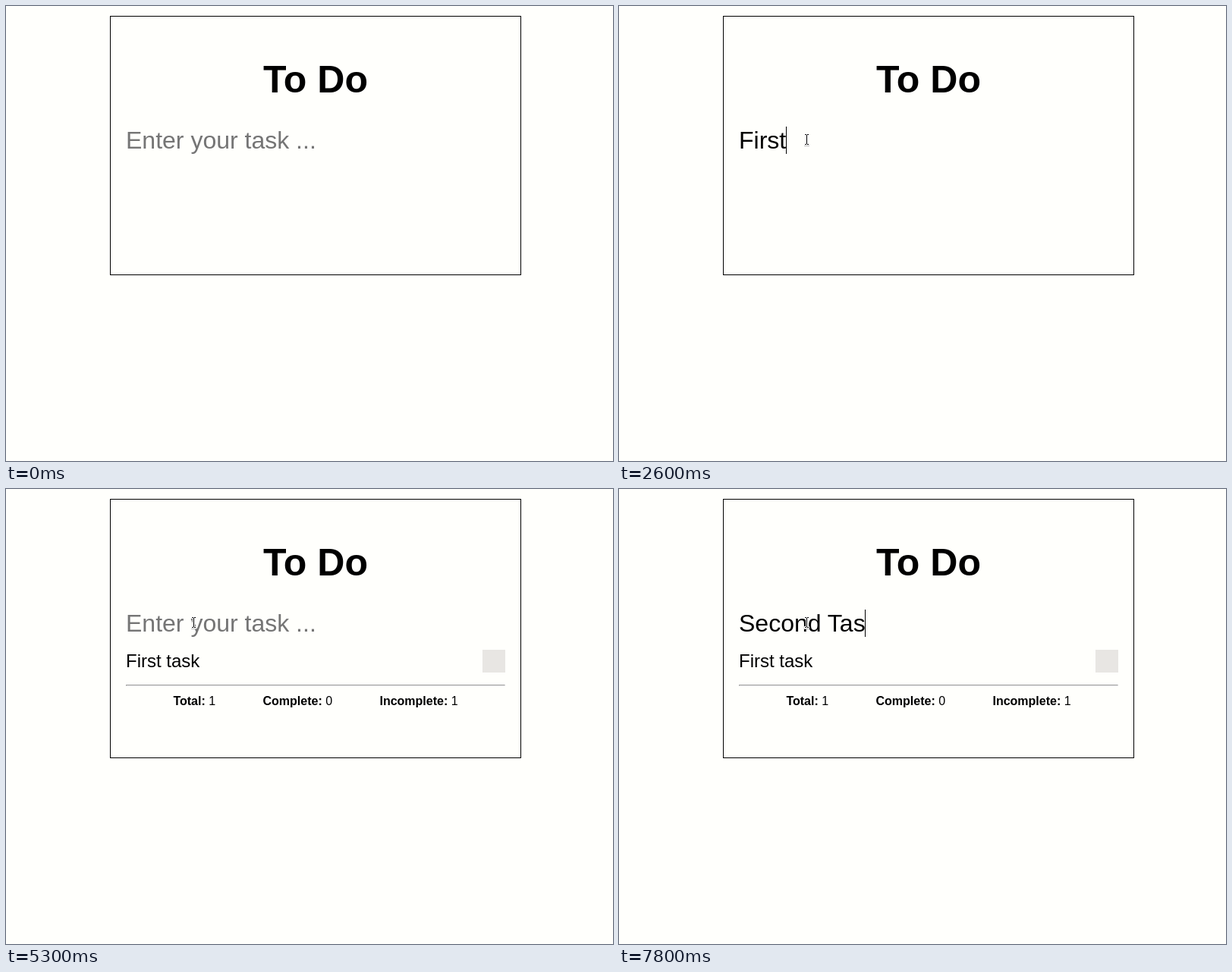
Write an HTML page with a canvas that moves like this. It is 800 px wide and 600 px high and loops after 8 s.

```html
<!DOCTYPE html>
<html lang="en">
<head>
<meta charset="utf-8">
<title>To Do</title>
<style>
  html, body { margin: 0; width: 100%; height: 100%; overflow: hidden; background: #fffffc; }
  body { position: relative; color: #000; font: 16px "Liberation Sans", Arial, sans-serif; }
  body > * { position: absolute; margin: 0; white-space: pre; box-sizing: border-box; }
  #card { left: 137px; top: 13px; width: 542px; height: 342px; border: 1px solid #000; }
  h1 { left: 158px; top: 67.5px; width: 500px; text-align: center; font-size: 50px; }
  #field { left: 158px; top: 159px; font-size: 32px; }
  #field.empty { color: #757575; }
  #caret { top: 159px; width: 1px; height: 36px; background: #000; }
  #list { left: 0; top: 0; }
  #list > * { position: absolute; margin: 0; }
  #task { left: 158px; top: 213px; font-size: 24px; }
  #check { left: 628px; top: 212px; width: 30px; height: 30px; background: #e8e6e3; }
  hr { left: 158px; top: 258px; width: 500px; box-sizing: border-box; }
  #stats { left: 158px; top: 271px; width: 500px; display: flex; justify-content: space-evenly; }
  canvas { left: 0; top: 0; }
</style>
</head>
<body>
<div id="card"></div>
<h1>To Do</h1>
<div id="field"></div>
<div id="caret"></div>
<div id="list"><div id="task">First task</div><div id="check"></div><hr><div id="stats"><span><b>Total:</b> 1</span><span><b>Complete:</b> 0</span><span><b>Incomplete:</b> 1</span></div></div>
<canvas id="pointer" width="800" height="600"></canvas>
<script>
const LOOP = 8000;
const LIST_SHOWN = 4100;
const byId = id => document.getElementById(id);
const field = byId("field"), caret = byId("caret"), list = byId("list");
const ctx = byId("pointer").getContext("2d");

// [time, typed text, caret visible]
const typing = [
  [0, "", false], [800, "", true], [1400, "", false],
  [1700, "F", true], [1900, "Fi", true], [2100, "Fir", true], [2300, "Firs", true],
  [2600, "First", true], [2800, "First ", true], [2900, "First t", true],
  [3100, "First ta", true], [3300, "First tas", true], [3400, "First task", true],
  [4100, "", false], [4700, "", true], [5300, "", false],
  [5400, "S", true], [5700, "Se", true], [6000, "Sec", true], [6200, "Seco", true],
  [6300, "Secon", true], [6400, "Second", true], [6900, "Second ", true],
  [7500, "Second T", true], [7800, "Second Tas", true]
];

// [time, shape, x, y]
const pointerPath = [
  [0, null, 0, 0], [300, drawArrow, 253, 66], [400, drawArrow, 243, 118],
  [500, drawBeam, 250, 165], [700, drawBeam, 248, 171], [800, drawBeam, 247, 176]
];

const stepAt = (steps, t) => steps.filter(s => s[0] <= t).pop();

function drawArrow(x, y) {
  ctx.beginPath();
  [[0.5, 0.5], [0.5, 16], [4, 12.7], [6.5, 18.3], [9, 17.2], [6.6, 11.8], [11.4, 11.5]]
    .forEach(([dx, dy]) => ctx.lineTo(x + dx, y + dy));
  ctx.closePath();
  ctx.fillStyle = "#000";
  ctx.strokeStyle = "#fff";
  ctx.fill();
  ctx.stroke();
}

function drawBeam(x, y) {
  const bar = (color, dx, dy, w, h) => {
    ctx.fillStyle = color;
    ctx.fillRect(x + dx, y + dy, w, h);
  };
  bar("#bbb", -3, 8, 7, 1);
  bar("#fff", -3, -8, 7, 3);
  bar("#fff", -3, 5, 7, 3);
  bar("#fff", -1, -6, 3, 12);
  bar("#000", -2, -7, 2, 1);
  bar("#000", 1, -7, 2, 1);
  bar("#000", 0, -6, 1, 12);
  bar("#000", -2, 6, 2, 1);
  bar("#000", 1, 6, 2, 1);
}

function render(now) {
  const t = now % LOOP;
  const [, text, caretOn] = stepAt(typing, t);
  const [, shape, x, y] = stepAt(pointerPath, t);

  field.textContent = text || "Enter your task ...";
  field.className = text ? "" : "empty";
  const width = text ? field.getBoundingClientRect().width : 0;
  caret.style.left = 158 + Math.floor(width) + "px";
  caret.style.visibility = caretOn ? "visible" : "hidden";
  list.style.visibility = t >= LIST_SHOWN ? "visible" : "hidden";

  ctx.clearRect(0, 0, 800, 600);
  if (shape) shape(x, y);
}

function tick() {
  render(performance.now());
  requestAnimationFrame(tick);
}
tick();
</script>
</body>
</html>
```
